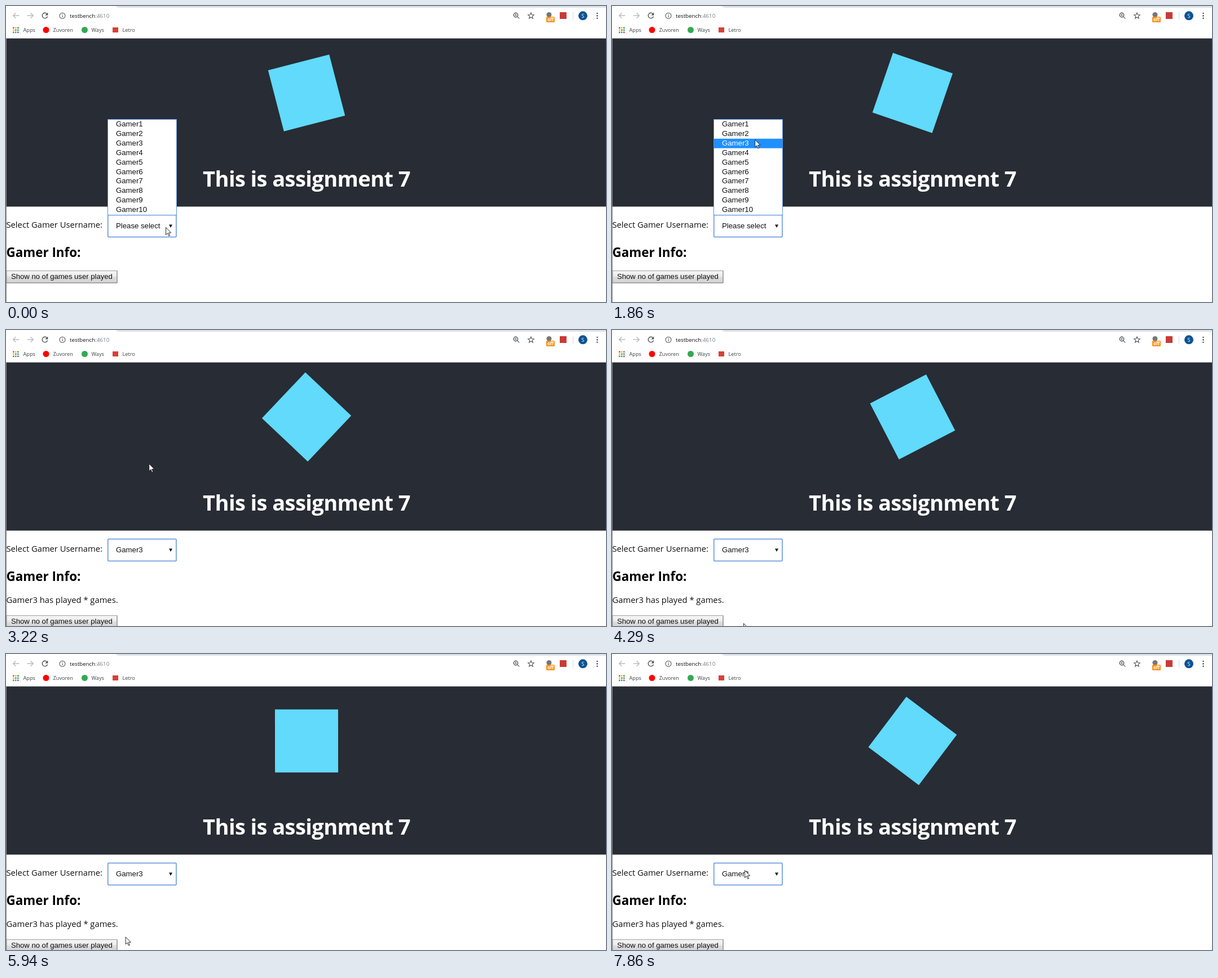
Write an HTML page that moves like this. It is 1064x526 px and loops after 7.99 s.

```html
<!DOCTYPE html>
<html lang="en">
<head>
<meta charset="utf-8">
<title>Gamer picker</title>
<style>
  html, body { margin: 0; width: 100%; height: 100%; overflow: hidden; background: #fff; }
  svg { display: block; width: 1064px; height: 526px; }
  text { white-space: pre; }
  .ui { font-family: "Open Sans", "Noto Sans", sans-serif; font-size: 14.75px; fill: #111; }
  .bar { font-size: 9.2px; fill: #3c4043; }
  .bold { font-weight: 700; }
  .title { font-size: 38px; letter-spacing: -.015em; fill: #fff; }
  .form { font-family: "Liberation Sans", Arial, sans-serif; font-size: 13.2px; fill: #111; }
  .icon { fill: none; stroke: #4f5358; stroke-width: 1.4; }
  .thin { stroke-width: 1.1; }
  .dim { stroke: #babcbe; }
  .focus { fill: #fff; stroke: #5c90df; }
  .hover rect { fill: #1e90ff; }
  .hover text { fill: #fff; }
</style>
</head>
<body>
<svg viewBox="0 0 1064 526">
  <defs>
    <linearGradient id="face" x2="0" y2="1">
      <stop offset="0" stop-color="#f5f5f5"/>
      <stop offset=".45" stop-color="#ededed"/>
      <stop offset=".5" stop-color="#dedede"/>
      <stop offset="1" stop-color="#d2d2d2"/>
    </linearGradient>
  </defs>
  <rect width="1064" height="526" fill="#fff"/>

  <!-- browser bars -->
  <path d="M194 0H1064V3H202Q197 3 194 0Z" fill="#dee1e6"/>
  <path class="icon dim" d="M23.5 17H13M17.5 12.2L12.7 17l4.8 4.8M37.5 17H48M43.5 12.2l4.8 4.8-4.8 4.8"/>
  <path class="icon" d="M72.6 13.8A4.8 4.8 0 1 0 73.6 18.5"/>
  <path d="M74.3 11.6v5h-5z" fill="#4f5358"/>
  <circle class="icon thin" cx="100" cy="17.3" r="5"/>
  <path class="icon thin" d="M100 16.6v3.4M100 14.2v1.2"/>
  <text class="ui" x="113" y="21" style="font-size:9.8px">testbench<tspan fill="#777b80">:4610</tspan></text>
  <circle class="icon" cx="904" cy="16" r="3.7"/>
  <path class="icon thin" d="M906.8 18.8l3.6 3.6M902.2 16h3.6M904 14.2v3.6"/>
  <path class="icon thin" d="M931 12l1.5 3.5 3.8.3-2.9 2.5.9 3.7-3.3-2-3.3 2 .9-3.7-2.9-2.5 3.8-.3z"/>
  <circle cx="963" cy="15.5" r="4.5" fill="#777"/>
  <rect x="958" y="19" width="15" height="10" rx="1.5" fill="#f7931a"/>
  <text class="ui bold" x="965.5" y="27" text-anchor="middle" style="font-size:8px;fill:#fff">off</text>
  <rect x="982" y="11" width="12" height="12" fill="#c93a35"/>
  <path d="M1005.5 11v13" stroke="#d5d7da"/>
  <circle cx="1023" cy="17.3" r="8" fill="#0b5394"/>
  <text class="ui" x="1023" y="20.5" text-anchor="middle" style="font-size:9px;fill:#fff">S</text>
  <g fill="#4f5358">
    <circle cx="1048.5" cy="13" r="1.3"/><circle cx="1048.5" cy="17.4" r="1.3"/><circle cx="1048.5" cy="21.8" r="1.3"/>
  </g>
  <g id="apps"></g>
  <g class="ui">
    <text class="bar" x="30.5" y="46">Apps</text>
    <text class="bar" x="83.5" y="46">Zuvoren</text>
    <text class="bar" x="151.5" y="46">Ways</text>
    <text class="bar" x="206.5" y="46">Letro</text>
  </g>
  <circle cx="71" cy="42.5" r="5.5" fill="#f00"/>
  <circle cx="139.5" cy="42.5" r="5.5" fill="#34a853"/>
  <rect x="189" y="38" width="10" height="9" fill="#d93f35"/>

  <!-- page header -->
  <rect y="57" width="1064" height="1" fill="#a5a7aa"/>
  <rect y="58" width="1064" height="298.5" fill="#282c34"/>
  <rect id="badge" x="-56" y="-56" width="112" height="112" fill="#61dafb"/>
  <text class="ui bold title" x="533" y="321" text-anchor="middle">This is assignment 7</text>

  <!-- form -->
  <text class="ui" x="0.5" y="394">Select Gamer Username:</text>
  <rect class="focus" x="180.7" y="371.6" width="121.2" height="39" rx="1" stroke-width="1.5"/>
  <text id="choice" class="form" x="195" y="395"></text>
  <path d="M289 388.4h6l-3 5.6z" fill="#111"/>
  <text class="ui bold" x="0.5" y="446" style="font-size:22.4px;fill:#000">Gamer Info:</text>
  <text id="played" class="ui" x="0.5" y="485">Gamer3 has played * games.</text>
  <g id="button">
    <rect x="1" y="470.5" width="196" height="21.5" fill="url(#face)" stroke="#a0a0a0"/>
    <path d="M1 492h196v-21.5" fill="none" stroke="#8a8a8a"/>
    <text class="form" x="9" y="485" style="font-size:13.1px">Show no of games user played</text>
  </g>
  <path d="M.5 58V526" stroke="#85878a"/>

  <g id="list"><rect class="focus" x="180.5" y="201.5" width="122" height="170"/></g>
  <path id="cursor" d="M0 0V13l3-2.8 2.2 5 2-.9-2.2-4.8h4.2z" fill="#fff" stroke="#111" stroke-width=".9"/>
</svg>
<script>
  const LOOP = 7990, PICK = 2550, ROW = 16.9, TOP = 202;
  const $ = id => document.getElementById(id);

  function add(parent, tag, attrs, text = '') {
    const el = document.createElementNS('http://www.w3.org/2000/svg', tag);
    for (const key in attrs) el.setAttribute(key, attrs[key]);
    el.textContent = text;
    return parent.appendChild(el);
  }

  const tints = ['#ea4335', '#fbbc05', '#34a853', '#4285f4'];
  for (let i = 0; i < 9; i++) {
    const col = i % 3, row = Math.floor(i / 3);
    add($('apps'), 'rect', {
      x: 12 + col * 4, y: 37.5 + row * 4, width: 2.6, height: 2.6, fill: tints[(col + row) % 4]
    });
  }

  const rows = Array.from({ length: 10 }, (_, i) => {
    const row = add($('list'), 'g', {}), y = TOP + i * ROW;
    add(row, 'rect', { x: 181, y, width: 121, height: ROW, fill: 'none' });
    add(row, 'text', { class: 'form', x: 195, y: y + 12 }, 'Gamer' + (i + 1));
    return row;
  });

  // The picture advances in short holds, eight to a run.
  const runs = [[120, 1050], [1180, 2130], [2280, 3220], [3340, 4290],
    [4440, 5400], [5520, 6510], [6630, 7590], [7710, 8760]];
  function hold(t) {
    const run = runs.findLast(r => r[0] <= t);
    if (!run) return 0;
    const step = (run[1] - run[0]) / 7;
    return run[0] + Math.min(7, Math.floor((t - run[0]) / step + 0.01)) * step;
  }

  // time, x, y of the pointer tip
  const path = [[0, 283.5, 393.5], [1050, 283.5, 393.5], [1800, 253.7, 237.7], [3230, 253.7, 237.7],
    [4280, 233.5, 521.5], [4440, 233.5, 521.5], [5200, 221.5, 504.5], [5400, 221.5, 502.8],
    [5520, 221.5, 502.8], [6380, 184.5, 502.8], [6800, 184.5, 502.8], [7580, 235.5, 384.5], [LOOP, 235.5, 384.5]];
  function pointer(t) {
    const i = path.findIndex(p => p[0] > t), [a, b] = [path[i - 1], path[i]];
    const u = (t - a[0]) / (b[0] - a[0]), e = u * u * (3 - 2 * u);
    return [a[1] + (b[1] - a[1]) * e, a[2] + (b[2] - a[2]) * e];
  }

  function draw(now) {
    const t = hold(now % LOOP), open = t < PICK, [x, y] = pointer(t);
    $('badge').setAttribute('transform', `translate(533 154.5) rotate(${t * 0.018 - 14.5})`);
    $('cursor').setAttribute('transform', `translate(${x} ${y})`);
    $('list').style.display = open ? '' : 'none';
    $('played').style.display = open ? 'none' : '';
    $('choice').textContent = open ? 'Please select' : 'Gamer3';
    $('button').setAttribute('transform', `translate(0 ${open ? 0 : 37})`);
    const over = Math.floor((y - TOP) / ROW);
    rows.forEach((row, i) => row.setAttribute('class', i === over ? 'hover' : ''));
  }

  const start = performance.now();
  function tick() {
    draw(performance.now() - start);
    requestAnimationFrame(tick);
  }
  tick();
</script>
</body>
</html>
```
